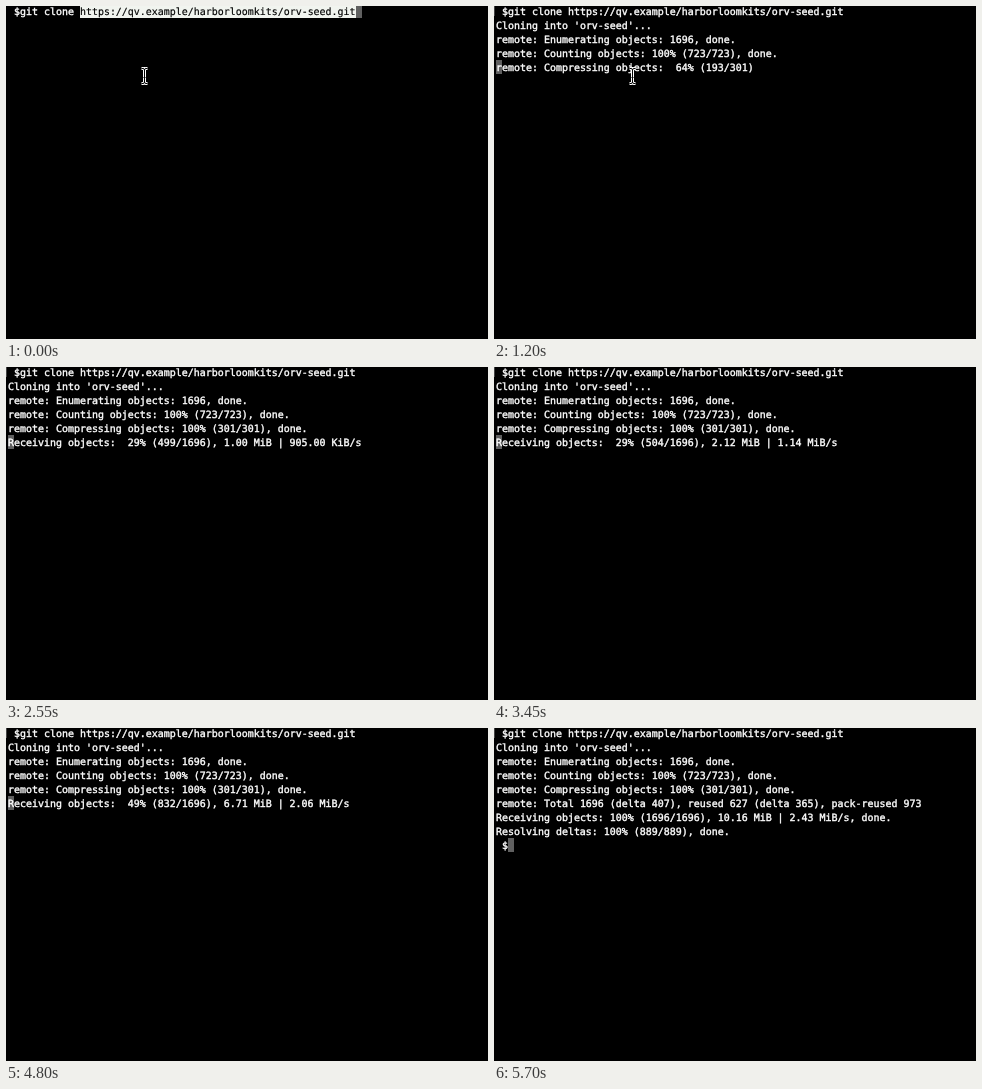
An HTML page that plays this animation: 482 by 333 pixels, repeating every 8 s.

```html
<!DOCTYPE html>
<html lang="en">
<head>
<meta charset="utf-8">
<title>Terminal clone</title>
<style>
html, body { margin: 0; width: 100%; height: 100%; overflow: hidden; background: #000; }
svg { display: block; width: 482px; height: 333px; }
text {
  font-family: "DejaVu Sans Mono", "Liberation Mono", monospace;
  font-size: 9.967px;
  text-rendering: geometricPrecision;
  white-space: pre;
  fill: #fff;
  stroke: #fff;
  stroke-width: .4px;
}
.picked { fill: #000; stroke: #000; stroke-width: .15px; }
</style>
</head>
<body>
<svg viewBox="0 0 482 333">
  <defs>
    <path id="beam" d="M1.5 1.5H3Q4.5 1.5 4.5 3Q4.5 1.5 6 1.5H7.5M4.5 3V15M1.5 16.5H3Q4.5 16.5 4.5 15Q4.5 16.5 6 16.5H7.5M3.5 10.5H5.5"/>
  </defs>
  <rect width="482" height="333" fill="#000"/>
  <rect id="selection" x="74" y="0" width="276" height="12" fill="#f1f4ef"/>
  <rect id="mark" width="1" height="10" fill="#444"/>
  <rect id="caret" width="6" height="14" fill="#606060"/>
  <!-- a hair of rotation keeps baselines from snapping to whole pixels -->
  <g id="rows" transform="rotate(.01)"></g>
  <g id="pointer" fill="none">
    <use href="#beam" stroke="#fff" stroke-width="3"/>
    <use href="#beam" stroke="#000" stroke-width="1"/>
  </g>
</svg>
<script>
const LOOP = 8000, LEFT = 2, CELL = 6, LINE = 14, BASE = 8.5;
const $ = id => document.getElementById(id);

const command = ' $git clone ';
const address = 'https://qv.example/harborloomkits/orv-seed.git';
const cloning = "Cloning into 'orv-seed'...";
const listed = 'remote: Enumerating objects: 1696, done.';
const counted = 'remote: Counting objects: 100% (723/723), done.';

const progress = (label, n, total, tail = '') =>
  `${label}: ${String(Math.floor(n / total * 100)).padStart(3)}% (${n}/${total})${tail}`;
const compress = (n, tail) => progress('remote: Compressing objects', n, 301, tail);
const receive = (n, tail) => progress('Receiving objects', n, 1696, tail);
const resolve = (n, tail) => progress('Resolving deltas', n, 889, tail);
const rate = (size, speed) => `, ${size} | ${speed}`;
const fast = (size, speed) => rate(size + ' MiB', speed + ' MiB/s');

const packed = [cloning, listed, counted, compress(301, ', done.')];
const total = 'remote: Total 1696 (delta 407), reused 627 (delta 365), pack-reused 973';
const received = [...packed, total, receive(1696, fast('10.16', '2.43') + ', done.')];
const resolved = [...received, resolve(889, ', done.')];

// Each step: start time, output lines, caret row, caret column
const steps = [
  [0, [], 0, 58],
  [750, [], 1, 0],
  [900, [cloning], 2, 0],
  [1200, [cloning, listed, counted, compress(193)], 4, 0]
];

// Download updates: start time, objects so far, size and speed
[
  [1350, 153],
  [1500, 340],
  [1950, 458, rate('516.00 KiB', '918.00 KiB/s')],
  [2400, 499, rate('1.00 MiB', '905.00 KiB/s')],
  [3450, 504, fast('2.12', '1.14')],
  [3600, 594, fast('3.36', '1.51')],
  [3750, 645, fast('3.36', '1.51')],
  [3900, 696, fast('3.36', '1.51')],
  [4200, 747, fast('4.48', '1.75')],
  [4350, 758, fast('4.48', '1.75')],
  [4800, 832, fast('6.71', '2.06')],
  [4950, 1408, fast('9.07', '2.43')],
  [5100, 1646, fast('9.07', '2.43')]
].forEach(([at, n, tail]) => steps.push([at, [...packed, receive(n, tail)], 5, 0]));

steps.push(
  [5400, [...received, resolve(205)], 7, 0],
  [5550, resolved, 8, 0],
  [5700, [...resolved, ' $'], 8, 2]
);

const SVG = 'http://www.w3.org/2000/svg';
function add(parent, tag, attrs = {}, text = '') {
  const node = parent.appendChild(document.createElementNS(SVG, tag));
  for (const key in attrs) node.setAttribute(key, attrs[key]);
  node.textContent = text;
  return node;
}

const rows = Array.from({ length: 9 }, (_, i) =>
  add($('rows'), 'text', { x: LEFT, y: i * LINE + BASE }));
add(rows[0], 'tspan', {}, command);
const link = add(rows[0], 'tspan', {}, address);

const show = (id, on) => $(id).setAttribute('visibility', on ? 'visible' : 'hidden');

let shown = -1;
function draw(t) {
  const index = steps.findLastIndex(s => s[0] <= t);
  if (index !== shown) {
    shown = index;
    const [, lines, row, col] = steps[index];
    rows.slice(1).forEach((r, i) => { r.textContent = lines[i] || ''; });
    $('caret').setAttribute('x', LEFT + col * CELL);
    $('caret').setAttribute('y', row * LINE - 2);
    link.setAttribute('class', index ? '' : 'picked');
    show('selection', index === 0);
    show('mark', index > 0);
  }
  show('pointer', t < 2550);
  $('pointer').setAttribute('transform', t < 2400 ? 'translate(134 61)' : 'translate(111 82)');
}

function tick() {
  draw(performance.now() % LOOP);
  requestAnimationFrame(tick);
}
tick();
</script>
</body>
</html>
```
